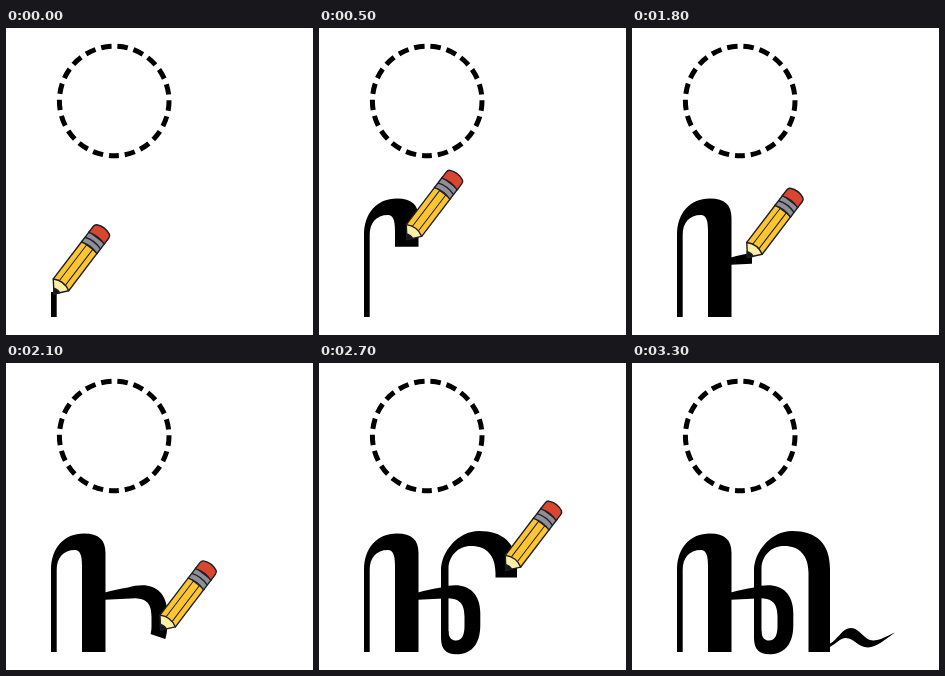
Animation, 307 px wide and 307 px high, one loop 5.3 s. Source, as an HTML page:

```html
<!DOCTYPE html>
<html lang="en">
<head>
<meta charset="utf-8">
<title>Letter tracing</title>
<style>
  html, body { margin: 0; width: 100%; height: 100%; overflow: hidden; background: #fff; }
  svg { display: block; width: 100vw; height: 100vh; }
</style>
</head>
<body>
<svg id="stage" viewBox="0 0 307 307">
  <defs id="defs"></defs>
  <rect width="307" height="307" fill="#fff"/>
  <circle id="ring" cx="108.2" cy="73" r="54.8" fill="none" stroke="#000" stroke-width="5" transform="rotate(90 108.2 73)"/>
  <g id="ink"></g>
  <!-- Pencil lies along +x with its point at the origin -->
  <g id="pencil" stroke="#1d1d28" stroke-width="1.4" stroke-linejoin="round">
    <path d="M11.5 -9.7H59V9.7H11.5Z" fill="#fdc52f"/>
    <path d="M14 -3.8H59M14 3.8H59" fill="none" stroke-width="1"/>
    <path d="M0 0L11.5 -9.7Q17 0 11.5 9.7Z" fill="#fbf1a6"/>
    <path d="M0 0L4.4 -3.7Q6 0 4.4 3.7Z" fill="#15151d"/>
    <path d="M58 -9.7H71V9.7H58Q61.5 0 58 -9.7Z" fill="#8f9097"/>
    <path d="M64 -9.7Q67.5 0 64 9.7" fill="none"/>
    <path d="M70 -9.7H77.5Q80 -9.7 81 -8Q85 0 81 8Q80 9.7 77.5 9.7H70Q73.5 0 70 -9.7Z" fill="#d9462f"/>
  </g>
</svg>
<script>
const LOOP = 5300, STEP = 100, LAG = 4.5, LIFT = 2.5;
const $ = id => document.getElementById(id);

function add(parent, tag, attrs) {
  const el = document.createElementNS('http://www.w3.org/2000/svg', tag);
  for (const key in attrs) el.setAttribute(key, attrs[key]);
  return parent.appendChild(el);
}

// shape: finished ink; route: the pen's way; reach: length drawn after each step
const strokes = [
  {
    start: 0, width: 44,
    shape: 'M45 289V207C45 185 58 170.5 78 170.5C93 170.5 99.5 177 99.5 190V289H76V203C76 192 74 187 69 187C57 187 50.7 195 50.7 207V289Z',
    route: 'M48 289V207C48 188 60 179 76 178C85 178 88 187 88 200V289',
    reach: [25, 58, 90, 121, 146, 174, 208, 245]
  },
  {
    start: 1800, width: 32,
    shape: 'M99 229.5C106 227 114 226 122 224.5C144 217.5 161.3 226 161.3 250V262C161.3 283 151 291.3 137 291.3C127 291.3 122 286 122 275L129.5 268C129.5 275 133 277.5 137 277.5C143 277.5 145.5 272 145.5 263V254C145.5 240 140 236 129.5 235.3L99 236.8Z',
    route: 'M99 232H135C150 232 155 242 155 256V265C155 280 147 285 137 285C129 285 126 280 126 272',
    reach: [21, 45, 70, 90, 109, 126]
  },
  {
    start: 2400, width: 32,
    shape: 'M122 276V207C122 189 139 168 160 168C184 168 198 180 198 206V289H176.5V210C176.5 193 168 183 152 183C139 183 129.5 193 129.5 206V276Z',
    route: 'M126 275V205C126 185 140 176 157 176C178 176 187 188 187 205V289',
    reach: [50, 100, 137, 175, 212, 251]
  },
  {
    start: 3000, width: 34,
    shape: 'M197 281C205 278 210 265 219 265C228 265 232 277.5 241 277.5C248 277.5 255 273 263 269.5C254 276 244 284.5 236 284.5C226 284.5 222 275 214 275C208 275 204 281 197 284.5Z',
    route: 'M197 283C205 279 210 270 219 270C228 270 232 281 240 281C248 281 255 274 263 269',
    reach: [22, 50, 80]
  }
];

strokes.forEach((s, i) => {
  const mask = add($('defs'), 'mask', {
    id: 'reveal' + i, maskUnits: 'userSpaceOnUse', x: 0, y: 0, width: 307, height: 307
  });
  s.pen = add(mask, 'path', { d: s.route, fill: 'none', stroke: '#fff', 'stroke-width': s.width });
  s.ink = add($('ink'), 'path', { d: s.shape });
});

// Odd count: a dash centred at the bottom, a gap at the top
const pitch = 2 * Math.PI * 54.8 / 21, dash = pitch * 0.64;
$('ring').setAttribute('stroke-dasharray', `${dash} ${pitch - dash}`);
$('ring').setAttribute('stroke-dashoffset', dash / 2);

function draw(time) {
  const t = time % LOOP;
  let tip = null;
  strokes.forEach((s, i) => {
    const step = Math.floor((t - s.start) / STEP), last = s.reach.length - 1;
    s.ink.style.display = step < 0 ? 'none' : '';
    if (step < 0) return;
    const length = s.reach[Math.min(step, last)];
    s.pen.setAttribute('stroke-dasharray', `${length} 999`);
    s.ink.setAttribute('mask', step < last ? `url(#reveal${i})` : 'none');
    if (step <= last) tip = s.pen.getPointAtLength(length - LAG);
  });
  $('pencil').style.display = tip ? '' : 'none';
  if (tip) $('pencil').setAttribute('transform', `translate(${tip.x} ${tip.y - LIFT}) rotate(-52.7)`);
}

function tick() {
  draw(performance.now());
  requestAnimationFrame(tick);
}
tick();
</script>
</body>
</html>
```
